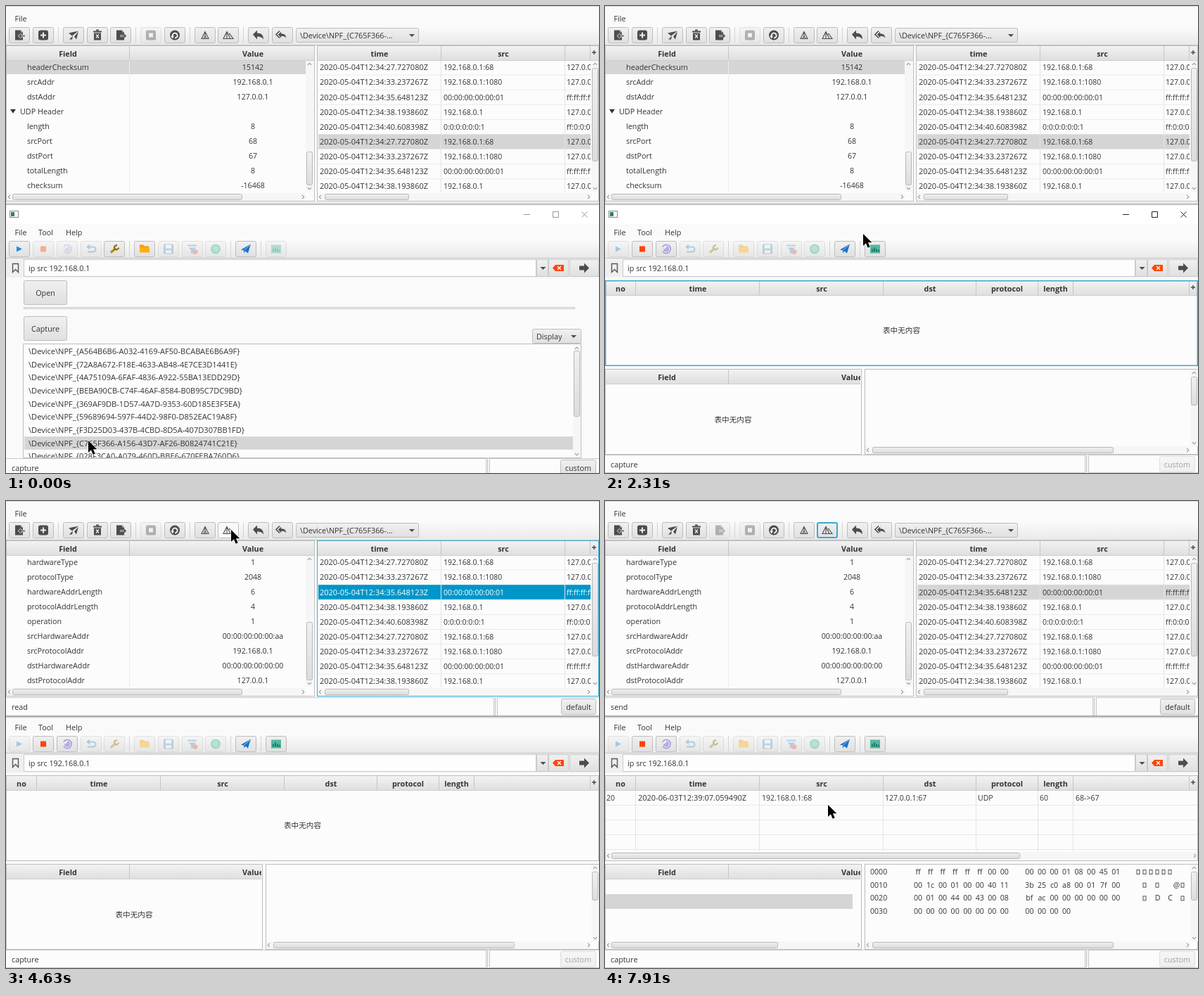
An HTML page that plays this animation: 843 by 664 pixels, repeating every 8000 ms.

```html
<!DOCTYPE html>
<html lang="en">
<head>
<meta charset="utf-8">
<title>Packet capture</title>
<style>
html, body { margin: 0; width: 100%; height: 100%; overflow: hidden; background: #fafafa; }
svg { display: block; }
text { font-family: "Open Sans", "Noto Sans CJK SC", sans-serif; white-space: pre; }
</style>
</head>
<body>
<svg id="stage" width="843" height="664"></svg>
<script>
const INK = '#333', DARK = '#4c4c4c', BLUE = '#0096c9', RING = '#35acd0', EDGE = '#bdbdbd', GREY = '#d5d5d5';
const LOOP = 8000;

const gradient = (id, a, b) => `<linearGradient id="${id}" x2="0" y2="1"><stop stop-color="${a}"/><stop offset="1" stop-color="${b}"/></linearGradient>`;
const DEFS = '<defs>' + gradient('btn', '#f0f0f0', '#e0e0e0') + gradient('head', '#f2f2f2', '#dfdfdf') +
  gradient('bar', '#fbfbfb', '#e9e9e9') + gradient('thumb', '#f0f0f0', '#dcdcdc') + gradient('shade', '#f0f0f0', '#b4b4b4') + '</defs>';

// Drawing helpers, all returning SVG markup
const rect = (x, y, w, h, fill, r = 0) => `<rect x="${x}" y="${y}" width="${w}" height="${h}" rx="${r}" fill="${fill}"/>`;
const box = (x, y, w, h, fill, stroke = EDGE, r = 0, sw = 1) =>
  `<rect x="${x + sw / 2}" y="${y + sw / 2}" width="${w - sw}" height="${h - sw}" rx="${r}" fill="${fill}" stroke="${stroke}" stroke-width="${sw}"/>`;
const path = (d, fill, stroke = 'none', sw = 1) => `<path d="${d}" fill="${fill}" stroke="${stroke}" stroke-width="${sw}"/>`;
const line = (d, stroke, sw = 1) => path(d, 'none', stroke, sw);
const text = (x, y, s, { size = 10.8, fill = INK, mid, bold } = {}) =>
  `<text x="${x}" y="${Math.round(y + 4)}" font-size="${size}" fill="${fill}"${mid ? ' text-anchor="middle"' : ''}${bold ? ' font-weight="700"' : ''}>${s}</text>`;
const center = (x, y, s, o) => text(x, y, s, { mid: true, ...o });
const clip = (x, y, w, h, body) => `<svg x="${x}" y="${y}" width="${w}" height="${h}" viewBox="${x} ${y} ${w} ${h}">${body}</svg>`;
const at = (x, y, body, opacity = 1) => `<g transform="translate(${x} ${y})" opacity="${opacity}">${body}</g>`;
const button = (x, y, w, h, label, opacity = 1) =>
  `<g opacity="${opacity}">${box(x, y, w, h, 'url(#btn)', EDGE, 2)}${center(x + w / 2, y + h / 2, label)}</g>`;
const caret = (x, y) => path(`M${x - 4} ${y - 2}h8l-4 4z`, DARK);

function hScroll(x1, x2, y, a, b) {
  return rect(x1, y - 1, x2 - x1, 11, '#f6f6f6') + box(a, y, b - a, 9, 'url(#thumb)', '#b9b9b9', 2) +
    line(`M${x1 + 5} ${y + 2}l-3 2.5 3 2.5M${x2 - 5} ${y + 2}l3 2.5-3 2.5`, '#777');
}
function vScroll(x, y1, y2, a, b) {
  return rect(x - 1, y1, 11, y2 - y1, '#f6f6f6') + box(x, a, 9, b - a, 'url(#thumb)', '#b9b9b9', 2) +
    line(`M${x + 2} ${y1 + 6}l2.5-3 2.5 3M${x + 2} ${y2 - 6}l2.5 3 2.5-3`, '#777');
}
// Column header: edges of the columns and [label, centre] pairs
function header(x, y, w, edges, labels) {
  return rect(x, y, w, 20, 'url(#head)') + rect(x, y + 20, w, 1, '#cfcfcf') +
    edges.map(e => rect(e, y, 1, 20, '#c6c6c6')).join('') +
    labels.map(([s, c]) => center(c, y + 10.5, s, { bold: true })).join('');
}
const plus = (x, y) => line(`M${x - 3} ${y}h6m-3-3v6`, DARK, 1.5);

// Icons, drawn around the origin
const doc = tip => path('M-6-7H2L5-4V7H-6z', DARK) + path('M2-7v3h3z', '#aaa') +
  line(tip < 0 ? 'M8 1H0m3-3L0 1l3 3' : 'M-1 1h8', '#eee', 3) + line(tip < 0 ? 'M8 1H0m3-3L0 1l3 3' : 'M-1 1h8m-3-3l3 3-3 3', DARK, 1.6);
const reply = 'M-8-1l6-6v4c6 0 9 3 9 9-2-3-4-4-9-4v4z';
const upperIcons = [
  doc(-1),
  rect(-7, -7, 14, 14, DARK, 3) + line('M-4 0h8m-4-4v8', '#eee', 2),
  path('M-7-3L7-6-2 1zM1 2L7-5 4 6zM-6 6l5-5-1 5z', DARK),
  rect(-6, -6, 12, 2, DARK) + rect(-2, -8, 4, 2, DARK) + path('M-5-3H5V7H-5z', DARK) + line('M-2-1l4 5m0-5l-4 5', '#eee', 1.3),
  doc(1),
  rect(-7, -7, 14, 14, DARK, 2) + rect(-3, -3, 6, 6, '#eee'),
  `<circle r="7" fill="${DARK}"/>` + line('M-3 2a3.5 3.5 0 1 1 3 2', '#eee', 2) + path('M-6 1h5l-2 4z', '#eee'),
  line('M0-5L5 5H-5zM0-5v6l-2 4M0 1l2 4', DARK, 1.1),
  line('M-2-5L3 5H-7zM1-1l1-1 5 7H3M-2-5v10', DARK, 1.1),
  path(reply, DARK),
  `<g transform="scale(.8)">${path(reply, DARK, '#e8e8e8')}</g>` + line('M-4-6l-5 5 5 5', DARK, 1.6)
];
const lowerIcons = [
  path('M-4-4L4 0-4 4z', '#158fe8'),
  rect(-4, -4, 8, 8, '#ff4500'),
  line('M-5-3A6 6 0 1 1-5 3M-3 0a3 3 0 1 0 3-3', '#a394e0', 1.5) + '<circle r="1.5" fill="#a394e0"/>',
  line('M-5-3H3a3.5 3.5 0 0 1 0 7H-5', '#4694c5', 2) + path('M-7-3l5-4v8z', '#4694c5'),
  line('M-5 5L2-1', '#b08a00', 3) + line('M4-5a3 3 0 1 0 2 3', '#8a7414', 2.4),
  path('M-7-6h5l2 2h6v3H-7z', '#f4a000') + path('M-7-2H7v7H-7z', '#ffae13'),
  box(-7, -7, 14, 14, '#72a9cf', '#4a8dbd', 1) + rect(-4, -6, 8, 5, '#eef6fb') + rect(-4, 2, 8, 4, '#eef6fb'),
  rect(-7, -6, 13, 2, '#559bd0') + path('M-5-2H5L2 2v4h-4V2z', '#559bd0') + '<circle cx="4" cy="4" r="3.5" fill="#ef6650"/>',
  '<circle r="7" fill="#35b486"/><circle r="4.5" fill="#68caa5"/>',
  path('M-7 1L7-7 3 6-1 3-3 6-3 2z', '#1a73c9') + line('M-3 2L6-6', '#b9dcf8', .8),
  rect(-7, -6, 14, 12, '#4fb99f') + line('M-4 4V0m3 4v-6m3 6v-4m3 4v-3', '#126b60', 1.6)
];

function toolbar(xs, y, icons, enabled, focus, hover) {
  return icons.map((icon, i) => {
    const ring = i === focus;
    return `<g opacity="${enabled(i) ? 1 : .4}">` +
      box(xs[i], y, 30, 23, i === hover ? '#f8f8f8' : 'url(#btn)', ring ? RING : '#bcbcbc', 2, ring ? 2 : 1) +
      at(xs[i] + 15, y + 11.5, icon) + '</g>';
  }).join('');
}
const dividers = (xs, y) => xs.map(x => rect(x, y, 1, 23, '#d4d4d4')).join('');

const packets = [
  ['27.727080', '192.168.0.1:68', '127.0.0.1:67'],
  ['33.237267', '192.168.0.1:1080', '127.0.0.1:80'],
  ['35.648123', '00:00:00:00:00:01', 'ff:ff:ff:ff'],
  ['38.193860', '192.168.0.1', '127.0.0.1'],
  ['40.608398', '0:0:0:0:0:0:1', 'ff:0:0:0']
];
const udpFields = 'headerChecksum 15142,srcAddr 192.168.0.1,dstAddr 127.0.0.1,,length 8,srcPort 68,dstPort 67,totalLength 8,checksum -16468';
const arpFields = 'hardwareType 1,protocolType 2048,hardwareAddrLength 6,protocolAddrLength 4,operation 1,srcHardwareAddr 00:00:00:00:00:aa,srcProtocolAddr 192.168.0.1,dstHardwareAddr 00:00:00:00:00:00,dstProtocolAddr 127.0.0.1';
const devices = `A564B6B6-A032-4169-AF50-BCABAE6B6A9F
72A8A672-F18E-4633-AB48-4E7CE3D1441E
4A75109A-6FAF-4836-A922-55BA13EDD29D
BEBA90CB-C74F-46AF-8584-B0B95C7DC9BD
369AF9DB-1D57-4A7D-9353-60D185E3F5EA
59689694-597F-44D2-98F0-D852EAC19A8F
F3D25D03-437B-4CBD-8D5A-407D307BB1FD
C765F366-A156-43D7-AF26-B0824741C21E
028F3CA0-A079-460D-BBE6-670FEBA760D6`.split('\n');
const hexDump = ['ff ff ff ff ff ff 00 00 00 00 00 01 08 00 45 01', '00 1c 00 01 00 00 40 11 3b 25 c0 a8 00 01 7f 00',
  '00 01 00 44 00 43 00 08 bf ac 00 00 00 00 00 00', '00 00 00 00 00 00 00 00 00 00 00 00'];
// "#" stands for an unprintable character
const hexChars = ['######', ' # #  @#', ' # D C #', ''];

function upperWindow(t) {
  const raised = t >= 3090, arp = t >= 3330, clicked = t >= 5160, sent = t >= 5280;
  const hover = t >= 4200 && t < 5160 ? 8 : -1;
  let s = rect(0, 0, 843, 309, '#fafafa') + rect(0, 0, 843, 1, '#d8d8d8') + text(12.5, 18, 'File') +
    rect(0, 29, 843, 27, 'url(#bar)') + rect(0, 55, 843, 1, '#c4c4c4') +
    dividers([74, 184, 261, 337], 30) +
    toolbar([4, 38, 81, 115, 148, 191, 225, 268, 301, 344, 378], 30, upperIcons, i => i !== 5 && !(sent && i === 4), clicked ? 8 : -1, hover) +
    box(412, 31, 175, 21, 'url(#btn)', EDGE, 2) + text(418, 42, '\\Device\\NPF_{C765F366-...') + caret(577, 42);

  // Field tree
  let tree = arp ? '' : rect(1, 77, 425, 20, GREY);
  (arp ? arpFields : udpFields).split(',').forEach((f, i) => {
    const y = 87 + 20.95 * i, [name, value] = f.split(' ');
    tree += f ? text(30, y, name) + center(351, y, value, { size: 10.6 }) : path(`M6 ${y - 3}h8l-4 6z`, INK) + text(20, y, 'UDP Header');
  });
  s += box(0, 56, 439, 222, '#fcfcfc') + clip(1, 77, 425, 188, tree + rect(175, 77, 1, 188, '#ececec')) +
    header(1, 57, 437, [175], [['Field', 88], ['Value', 351]]) +
    vScroll(427, 78, 264, arp ? 172 : 207, 255) + hScroll(1, 426, 267, 9, 336);

  // Packet table
  const picked = raised ? 2 : 5, focused = raised && !clicked;
  let rows = '';
  for (let i = 0; i < 9; i++) {
    const y = 77 + 21.1 * i, on = i === picked, [sec, src, dst] = packets[i % 5];
    const o = { fill: on && focused ? '#fff' : INK, size: 10.5 };
    if (on) rows += rect(444, y, 388, 21, focused ? BLUE : GREY);
    rows += rect(444, y + 20.6, 388, 1, '#ebebeb') + text(446, y + 10.3, '2020-05-04T12:34:' + sec + 'Z', { ...o, size: 11 }) +
      text(622, y + 10.3, src, o) + text(797, y + 10.3, dst, o);
  }
  rows += rect(618, 77, 1, 188, '#e4e4e4') + rect(794, 77, 1, 188, '#e4e4e4');
  s += box(442, 56, 401, 222, '#fcfcfc') + clip(443, 77, 388, 188, rows) +
    header(443, 57, 399, [618, 794, 830], [['time', 531], ['src', 707]]) + plus(836, 66) +
    vScroll(833, 78, 264, 88, 221) + hScroll(443, 832, 267, 453, 573) +
    box(442, 56, 401, 222, 'none', focused ? RING : EDGE);

  return s + status(279, 27, 694, sent ? 'send' : 'read') + button(789, 281, 50, 23, 'default');
}

function status(y, h, x, label) {
  return rect(0, y, 843, h, '#f5f5f5') + box(-1, y, x + 1, h, '#fcfcfc', '#c9c9c9') + rect(x + 1, y, 1, h, '#c4c4c4') +
    box(x + 4, y, 846 - x, h, '#fcfcfc', '#c9c9c9') + text(8, y + 13.5, label);
}

function openPage(active) {
  let list = '';
  devices.forEach((id, i) => {
    const y = 491 + 18.65 * i, on = i === 7;
    if (on) list += rect(26, y - 9.4, 780, 18.6, active ? BLUE : GREY);
    list += text(32, y, `\\Device\\NPF_{${id}}`, { size: 11.08, fill: on && active ? '#fff' : INK });
  });
  return button(25, 390, 62, 35, 'Open') + box(25, 428, 784, 3, '#eee', '#ccc') + button(25, 441, 62, 35, 'Capture') +
    box(748, 459, 70, 21, 'url(#btn)', EDGE, 2) + text(754, 470, 'Display') + caret(807, 470) +
    box(24, 480, 794, 163, '#fcfcfc', active ? RING : EDGE) + clip(26, 481, 781, 161, list) +
    vScroll(807, 482, 642, 490, 584);
}

function capturePage(t) {
  const focused = t >= 1930 && t < 3090, row = t >= 7030, detail = t >= 7150;
  const cols = [43, 219, 395, 527, 615, 665];
  let s = box(0, 390, 843, 122, '#fcfcfc');
  if (row) {
    for (let y = 432; y < 498; y += 21) s += rect(1, y, 841, 1, '#e8e8e8');
    s += cols.map(x => rect(x, 411, 1, 87, '#e4e4e4')).join('') +
      [['20', 2], ['2020-06-03T12:39:07.059490Z', 47, 11], ['192.168.0.1:68', 223], ['127.0.0.1:67', 398], ['UDP', 530], ['60', 618], ['68->67', 669]]
        .map(([v, x, size = 10.5]) => text(x, 421.5, v, { size })).join('') + hScroll(1, 842, 500, 9, 590);
  } else s += center(421.5, 461, '表中无内容', { size: 10.6 });
  s += header(1, 391, 841, [...cols, 830],
    [['no', 22], ['time', 132], ['src', 308], ['dst', 462], ['protocol', 571.5], ['length', 640.5]]) + plus(836, 400) +
    (focused ? box(0, 390, 843, 122, 'none', RING, 0, 1.5) : '');

  s += box(0, 516, 365, 122, '#fcfcfc') + clip(1, 517, 362, 21, header(1, 517, 362, [175], [['Field', 88], ['Value', 351]]));
  s += detail
    ? rect(1, 559, 351, 21, GREY) + hScroll(1, 364, 627, 9, 246)
    : center(182, 587.5, '表中无内容', { size: 10.6 });
  s += box(369, 516, 474, 122, '#fcfcfc') + vScroll(833, 517, 626, 527, 568) + hScroll(370, 832, 627, 380, 723);
  if (detail) hexDump.forEach((bytes, r) => {
    const y = 527 + 18.7 * r;
    s += text(377, y, '00' + r + '0', { size: 10.6 }) +
      bytes.split(' ').map((b, i) => center((i < 8 ? 445 : 463) + 17.55 * i, y, b, { size: 10.6 })).join('') +
      [...hexChars[r]].map((c, i) => {
        const x = 758.5 + 9 * i;
        return c === '#' ? box(x - 3, y - 3, 5, 7, 'none', '#555') : center(x, y, c, { size: 10.6 });
      }).join('');
  });
  return s;
}

function lowerWindow(t) {
  const active = t >= 1030, live = t >= 1280;
  const on = live ? [1, 2, 9, 10] : [0, 4, 5, 9], ctl = active ? '#222' : '#999';
  const foot = live ? 638 : 643;
  return rect(0, 279, 843, 4, 'url(#shade)') + rect(0, 283, 843, 381, '#fafafa') + rect(0, 283, 843, 27, '#fff') +
    box(5, 291, 13, 10, '#fff', '#888') + rect(7, 293, 5, 6, '#347a72') +
    line('M736 296.5h9M777.5 292.5h8v8h-8zM818.5 292.5l8 8m0-8l-8 8', ctl) +
    text(12.5, 321.5, 'File') + text(46, 321.5, 'Tool') + text(85, 321.5, 'Help') +
    rect(0, 332, 843, 26, 'url(#bar)') + rect(0, 358, 843, 1, '#c4c4c4') + dividers([175, 319, 362], 334) +
    toolbar([4, 38, 72, 106, 139, 182, 216, 250, 283, 326, 369], 334, lowerIcons, i => on.includes(i), live && t < 1930 ? 1 : -1) +
    rect(0, 359, 843, 27, '#f0f0f0') + line('M9.5 366.5h8v12l-4-4-4 4z', '#555', 1.4) +
    box(25, 360, 729, 25, '#fdfdfd', '#cacaca') + text(32, 372.5, 'ip src 192.168.0.1') +
    box(754, 360, 17, 25, 'url(#btn)', '#cacaca') + caret(763.5, 373) +
    box(771, 360, 29, 25, 'url(#btn)', '#cacaca') + path('M777 372.5l4-4.5h12v9h-12z', '#ff4500') + line('M784 370l5 5m0-5l-5 5', '#fff', 1.3) +
    box(801, 360, 42, 25, 'url(#btn)', '#cacaca') + path('M815 369.5h7v-4l7 7-7 7v-4h-7z', DARK) +
    (live ? capturePage(t) : openPage(active)) +
    status(foot, 26, 683, 'capture') + button(788, foot + 2, 51, 23, 'custom', live ? .45 : 1);
}

// Pointer stops: time, x, y
const stops = [
  [0, 117, 618], [1560, 130, 588], [1680, 158, 545], [1810, 205, 500], [1930, 254, 451],
  [2070, 290, 412], [2190, 335, 362], [2310, 367, 324], [2460, 386, 296], [2580, 415, 248], [2700, 447, 198], [2820, 476, 158], [2940, 489, 140],
  [3090, 495, 136], [3330, 480, 129], [3450, 448, 113], [3570, 418, 97], [3690, 396, 83],
  [3840, 376, 68], [3960, 350, 54], [4080, 332, 46], [4200, 325, 43], [4480, 324, 43], [4630, 320, 41],
  [5650, 336, 110], [5770, 364, 218], [5890, 390, 310], [6010, 402, 377], [6130, 397, 420], [6250, 395, 436], [6390, 375, 408],
  [6540, 362, 414], [6660, 354, 407], [6780, 350, 403], [7150, 347, 403], [7270, 344, 404], [7520, 338, 412], [7640, 328, 423], [7760, 320, 431], [7910, 317, 432]
];
function pointer(t) {
  const [, x, y] = stops.findLast(p => p[0] <= t);
  const overField = y > 360 && y < 385 && x < 753 && t > 6000;
  return at(x, y, overField
    ? line('M-3-6.5h6M-3 6.5h6M0-6.5v13', '#000', 2)
    : `<g paint-order="stroke">${path('M0 0v17l3.9-3.7 2.8 6.4 3-1.3-2.8-6.2h5.4z', '#000', '#fff', 1.2)}</g>`);
}

function scene(t) {
  const upper = upperWindow(t), lower = lowerWindow(t);
  const stack = t < 3090 ? upper + lower
    : lower + upper + rect(0, 305, 843, 2, '#a8a8a8') + rect(0, 307, 843, 2, '#dedede');
  return DEFS + stack + pointer(t);
}

const stage = document.getElementById('stage');
const cuts = [...new Set([...stops.map(p => p[0]), 1030, 1280, 5160, 5280, 7030])].sort((a, b) => a - b);
const start = performance.now();
let shown = -1;
function frame() {
  const t = (performance.now() - start) % LOOP;
  const cut = cuts.findLast(c => c <= t);
  if (cut !== shown) stage.innerHTML = scene(shown = cut);
  requestAnimationFrame(frame);
}
frame();
</script>
</body>
</html>
```
